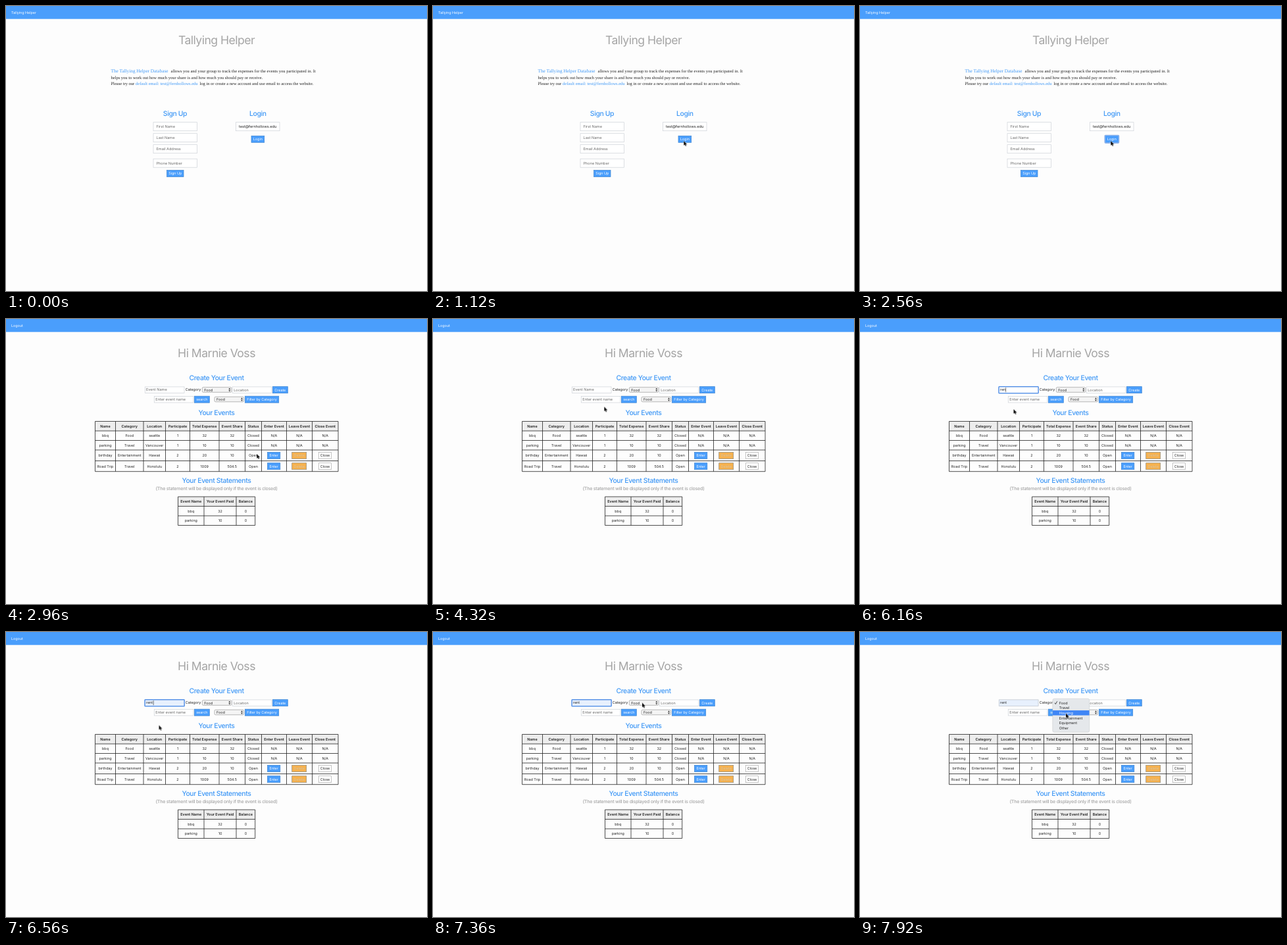
Recreate the animation shown at these times as an HTML page. Size 640 by 433 pixels, loop 8000 ms.

```html
<!DOCTYPE html>
<html lang="en">
<head>
<meta charset="utf-8">
<title>Shared expenses</title>
<style>
  html, body { margin: 0; width: 100%; height: 100%; overflow: hidden; background: #fdfdfd; }
  svg { display: block; width: 100vw; height: 100vh; }
  text { font: 5.4px Inter, Roboto, sans-serif; fill: #222; text-rendering: geometricPrecision; white-space: pre; }
  .mid { text-anchor: middle; }
  .title { font-size: 17.6px; letter-spacing: -.03em; fill: #a5a5a5; }
  .head { font-size: 10.4px; font-weight: 500; letter-spacing: -.035em; fill: #3f98f6; }
  .note { font-size: 7.1px; font-weight: 500; letter-spacing: -.035em; fill: #a5a5a5; }
  .th { font-size: 5.5px; font-weight: 600; }
  .white { fill: #fff; }
  .hint { font-size: 5.55px; fill: #6c6c6c; }
  .serif { font: 6.5px "Liberation Serif", Times, serif; }
  .link { fill: #3f98f6; }
  .lead { font-size: 7.25px; }
  .faded { fill: #d5c4a4; }
  .timed, #cursor { animation: 8s step-end infinite; }
  #cursor { animation-name: pointer; }
  @keyframes pointer {
    0% { opacity: 0; transform: translate(460px, 243px); }
    2% { opacity: 1; transform: translate(460px, 243px); }
    4% { transform: translate(437px, 231px); }
    7% { transform: translate(411px, 217px); }
    9% { transform: translate(394px, 209px); }
    12% { transform: translate(385px, 206px); }
    14%, 27%, 32% { transform: translate(381.2px, 205px); }
    47% { transform: translate(374px, 199px); }
    50% { transform: translate(336px, 172px); }
    52% { transform: translate(292px, 149px); }
    54% { transform: translate(260.3px, 133.3px); }
    57% { transform: translate(248px, 119px); }
    59% { transform: translate(246px, 112.5px); }
    62%, 67% { transform: translate(242px, 111.3px); }
    69% { transform: translate(238.2px, 110.8px); }
    72% { transform: translate(237px, 114px); }
    74% { transform: translate(235px, 126px); }
    77% { transform: translate(233.5px, 137px); }
    79%, 82% { transform: translate(232.5px, 141.6px); }
    84% { transform: translate(246px, 135px); }
    87% { transform: translate(283px, 118px); }
    89% { transform: translate(310px, 109px); }
    92%, 94% { transform: translate(318px, 107.5px); }
    97% { opacity: 1; transform: translate(314.5px, 116px); }
    99%, 100% { opacity: 1; transform: translate(313px, 123.6px); }
  }
</style>
</head>
<body>
<svg id="stage" viewBox="0 0 640 433" preserveAspectRatio="none"></svg>
<script>
const BLUE = '#4a9efc';
const sheet = document.head.appendChild(document.createElement('style')).sheet;

const text = (x, y, str, cls = '') => `<text x="${x}" y="${y}" class="${cls}">${str}</text>`;
const mid = (x, y, str, cls = '') => text(x, y, str, 'mid ' + cls);
const box = (x, y, w, h, fill, stroke = 'none', sw = .7, r = 0) =>
  `<rect x="${x}" y="${y}" width="${w}" height="${h}" rx="${r}" fill="${fill}" stroke="${stroke}" stroke-width="${sw}"/>`;
const button = (x, y, w, label, fill = BLUE, cls = 'white', edge = '#3c83cf') =>
  box(x, y, w, 10, fill, edge) + mid(x + w / 2, y + 6.9, label, cls);
const field = (x, y, w, h, label, pad, cls = 'hint') =>
  box(x, y, w, h, '#fff', '#cdd2d8') + text(x + pad, y + h / 2 + 2, label, cls);
const select = (x, y, label) =>
  box(x, y, 44.5, 7.6, '#f4f4f4', '#8c8c8c', .6, 1.5) + text(x + 3, y + 5.8, label) +
  `<path d="M${x + 40} ${y + 3.3}l1.5 -2 1.5 2zm0 1.2h3l-1.5 2z" fill="#222"/>`;

// Visible between two points of the loop, given in percent.
function during(from, to, body) {
  const name = `show-${from}-${to}`;
  sheet.insertRule(`@keyframes ${name} { 0% { opacity: 0 } ${from}% { opacity: 1 } ${to}%, 100% { opacity: ${to === 100 ? 1 : 0} } }`);
  return `<g class="timed" style="animation-name:${name}">${body}</g>`;
}

function table(xs, ys, rows) {
  const [left, right, top, bottom] = [xs[0], xs.at(-1), ys[0], ys.at(-1)];
  const lines = ys.map(y => `M${left} ${y}H${right}`).concat(xs.map(x => `M${x} ${top}V${bottom}`)).join('');
  const cells = rows.flatMap((row, r) => row.map((cell, c) =>
    mid((xs[c] + xs[c + 1]) / 2, (ys[r] + ys[r + 1]) / 2 + 2, cell, r ? '' : 'th')));
  return box(left, top, right - left, ys[1] - top, '#ededed') + cells.join('') +
    `<path d="${lines}" fill="none" stroke="#222" stroke-width=".8"/>`;
}

const navbar = label => box(0, 0, 640, 19.7, BLUE) + text(8, 11.8, label, 'white');

function welcomePage() {
  const signUp = [['First Name', 176.7], ['Last Name', 193.7], ['Email Address', 210.7], ['Phone Number', 232.2]];
  return navbar('Tallying Helper') +
    mid(320, 58.3, 'Tallying Helper', 'title') +
    text(159.5, 101.3, 'The Tallying Helper Database', 'serif link lead') +
    text(250.5, 101.3, 'allows you and your group to track the expenses for the events you participated in. It', 'serif') +
    text(159.5, 110.7, 'helps you to work out how much your share is and how much you should pay or receive.', 'serif') +
    text(159.5, 120, 'Please try our', 'serif') +
    text(197, 120, 'default email: test@fernhollows.edu', 'serif link') +
    text(294.5, 120, 'log in or create a new account and use email to access the website.', 'serif') +
    mid(257, 166.7, 'Sign Up', 'head') + mid(382.8, 166.7, 'Login', 'head') +
    signUp.map(([label, y]) => field(224, y, 66.5, 13, label, 4.5)).join('') +
    button(244.5, 249.5, 25.5, 'Sign Up') +
    box(349.5, 176.7, 66.5, 13, '#fff', '#cdd2d8') +
    `<clipPath id="inner"><path d="M353 177h58.8v12h-58.8z"/></clipPath>` +
    `<g clip-path="url(#inner)">${text(354, 185.2, 'test@fernhollows.edu', 'hint" style="fill:#222')}</g>` +
    button(373, 197.3, 19.7, 'Login') +
    during(29, 32, button(373, 197.3, 19.7, 'Login', '#3b86e0')) +
    during(32, 37, box(372.2, 196.5, 21.3, 11.6, BLUE, '#8fb4ea', 1.6, 1) + mid(382.8, 204.2, 'Login', 'white'));
}

function nameField() {
  const [x, base] = [213, 109.4];
  const caret = (from, to, at) => during(from, to, box(at, 104.2, .6, 7, '#222'));
  const typed = ['r', 're', 'ren'].map((part, i) =>
    during([72, 74, 77][i], [74, 77, 79][i], text(x, base, part))).join('');
  return box(211.3, 103, 59.7, 9.6, '#fff', '#cdd2d8') +
    during(79, 100, box(211.3, 103, 59.7, 9.6, '#e7f0fd', '#c3c9d2')) +
    during(67, 94, box(211, 102.7, 60.2, 10.1, 'none', '#5e97ea', 1.5, .8)) +
    during(0, 72, text(x, base, 'Event Name', 'hint')) + typed +
    during(79, 100, text(x, base, 'rent')) +
    caret(67, 72, 212.7) + caret(72, 74, 215.2) + caret(74, 77, 218.3) + caret(77, 79, 221.5) + caret(79, 84, 223.8);
}

function categoryMenu() {
  const items = ['Food', 'Travel', 'Housing', 'Entertainment', 'Equipment', 'Other'];
  const row = i => 109.5 + i * 7.7;
  const pick = (i, from, to) => during(from, to,
    box(293, row(i) - 5.8, 55.6, 7.5, '#3f86f6') + text(302.8, row(i), items[i], 'white'));
  return during(94, 100,
    box(292.4, 101.6, 56.8, 51.2, '#00000018', 'none', 0, 3) +
    box(293, 101.2, 55.6, 50.8, '#e5e8eb', '#cdd0d3', .5, 2.5) +
    items.map((item, i) => text(302.8, row(i), item)).join('')) +
    pick(0, 94, 97) + pick(1, 97, 99) + pick(2, 99, 100) +
    during(94, 100, '<path d="M296 107.7l1.3 1.8 2.4 -4.2" fill="none" stroke="#222" stroke-width=".8"/>');
}

function eventsPage() {
  const events = [
    ['Name', 'Category', 'Location', 'Participate', 'Total Expense', 'Event Share', 'Status', 'Enter Event', 'Leave Event', 'Close Event'],
    ['bbq', 'Food', 'seattle', 1, 32, 32, 'Closed', 'N/A', 'N/A', 'N/A'],
    ['parking', 'Travel', 'Vancouver', 1, 10, 10, 'Closed', 'N/A', 'N/A', 'N/A'],
    ['birthday', 'Entertainment', 'Hawaii', 2, 20, 10, 'Open'],
    ['Road Trip', 'Travel', 'Honolulu', 2, 1009, 504.5, 'Open']
  ];
  const statements = [['Event Name', 'Your Event Paid', 'Balance'], ['bbq', 32, 0], ['parking', 10, 0]];
  const actions = y => button(397.5, y, 19.3, 'Enter') +
    button(434.7, y, 22, 'Delete', '#f6b14e', 'faded', '#8d8a80') +
    button(475.3, y, 19.3, 'Close', '#fff', '', '#aaa');
  return box(0, 0, 640, 433, '#fdfdfd') + navbar('Logout') +
    mid(320, 58.3, 'Hi Marnie Voss', 'title') +
    mid(320, 93.2, 'Create Your Event', 'head') +
    nameField() + text(272.8, 109.4, 'Category') + select(298.3, 103.7, 'Food') +
    field(344.2, 103, 59.6, 9.6, 'Location', 2) + button(405.3, 102.7, 23, 'Create') +
    field(225.3, 117.4, 59.6, 9.6, 'Enter event name', 2) + button(286.3, 117.2, 23, 'search') +
    select(317, 118.2, 'Food') + button(363.3, 117.2, 51.4, 'Filter by Category') +
    mid(320, 146.2, 'Your Events', 'head') +
    table([135.5, 166.5, 209, 242.5, 279.5, 324, 363.5, 388.5, 426.5, 465.5, 505],
      [155.5, 170, 184.5, 199, 215.5, 231.7], events) +
    actions(202.4) + actions(218.7) +
    mid(320, 249, 'Your Event Statements', 'head') +
    mid(320, 260.2, '(The statement will be displayed only if the event is closed)', 'note') +
    table([261.5, 301, 350, 378.7], [270, 284.5, 299, 313.5], statements) +
    categoryMenu();
}

document.getElementById('stage').innerHTML =
  during(0, 37, welcomePage()) + during(37, 100, eventsPage()) +
  '<path id="cursor" d="M0 0V7L1.6 5.6 2.7 8.1 3.9 7.6 2.8 5.2H5z" fill="#111" stroke="#fff" stroke-width=".6" paint-order="stroke"/>';
</script>
</body>
</html>
```
